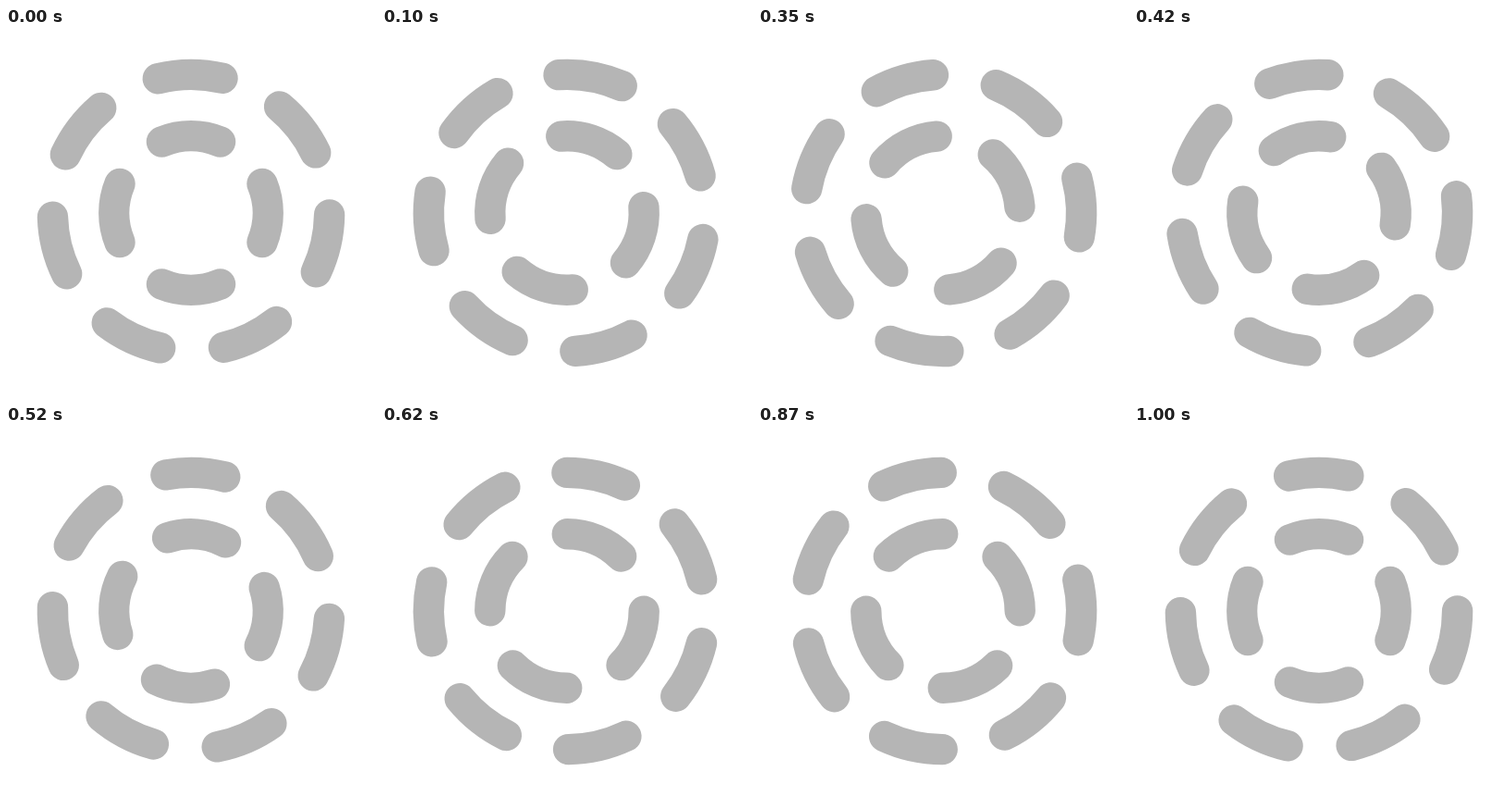
These frames come from a looping animation (400x400 px, 1020 ms). An HTML page with a canvas:

```html
<!DOCTYPE html>
<html lang="en">
<head>
<meta charset="utf-8">
<title>Loading</title>
<style>
  html, body { margin: 0; width: 100%; height: 100%; overflow: hidden; background: #fff; }
  canvas { display: block; width: 400px; height: 400px; }
</style>
</head>
<body>
<canvas id="stage" width="400" height="400"></canvas>
<script>
const ctx = document.getElementById('stage').getContext('2d');
const LOOP = 1020;
const STEPS = 40;
const OUTER = 149.6;
const INNER = 83.2;

// Angles are in degrees, clockwise from the top.
const rad = deg => (deg - 90) * Math.PI / 180;

function dash(radius, start, end) {
  ctx.beginPath();
  ctx.arc(200, 200, radius, rad(start), rad(end));
  ctx.stroke();
}

// Poses change 40 times a second, on whole hundredths of a second.
function progress(ms) {
  const cs = Math.floor(ms / 10);
  return (Math.ceil((cs + 1) / 2.5) - 1) / STEPS;
}

function draw(p) {
  ctx.fillStyle = '#fff';
  ctx.fillRect(0, 0, 400, 400);
  ctx.strokeStyle = '#b5b5b5';
  ctx.lineWidth = 33.4;
  ctx.lineCap = 'round';

  // Outer ring: one dash is longer and shrinks while the others grow.
  const span = 24.5 + 0.3 * p;
  const gap = 26.55 + 0.12 * p;
  let end = 13.15 + 101.8 * p;
  dash(OUTER, -13.8 + 103.75 * p, end);
  for (let i = 0; i < 6; i++) {
    const start = end + gap;
    end = start + span;
    dash(OUTER, start, end);
  }

  // Inner ring
  for (let i = 0; i < 4; i++) {
    const mid = i * 90 + 180 * p;
    dash(INNER, mid - 22.3, mid + 22.3);
  }
}

const begin = performance.now();
function tick() {
  draw(progress((performance.now() - begin) % LOOP));
  requestAnimationFrame(tick);
}
tick();
</script>
</body>
</html>
```
